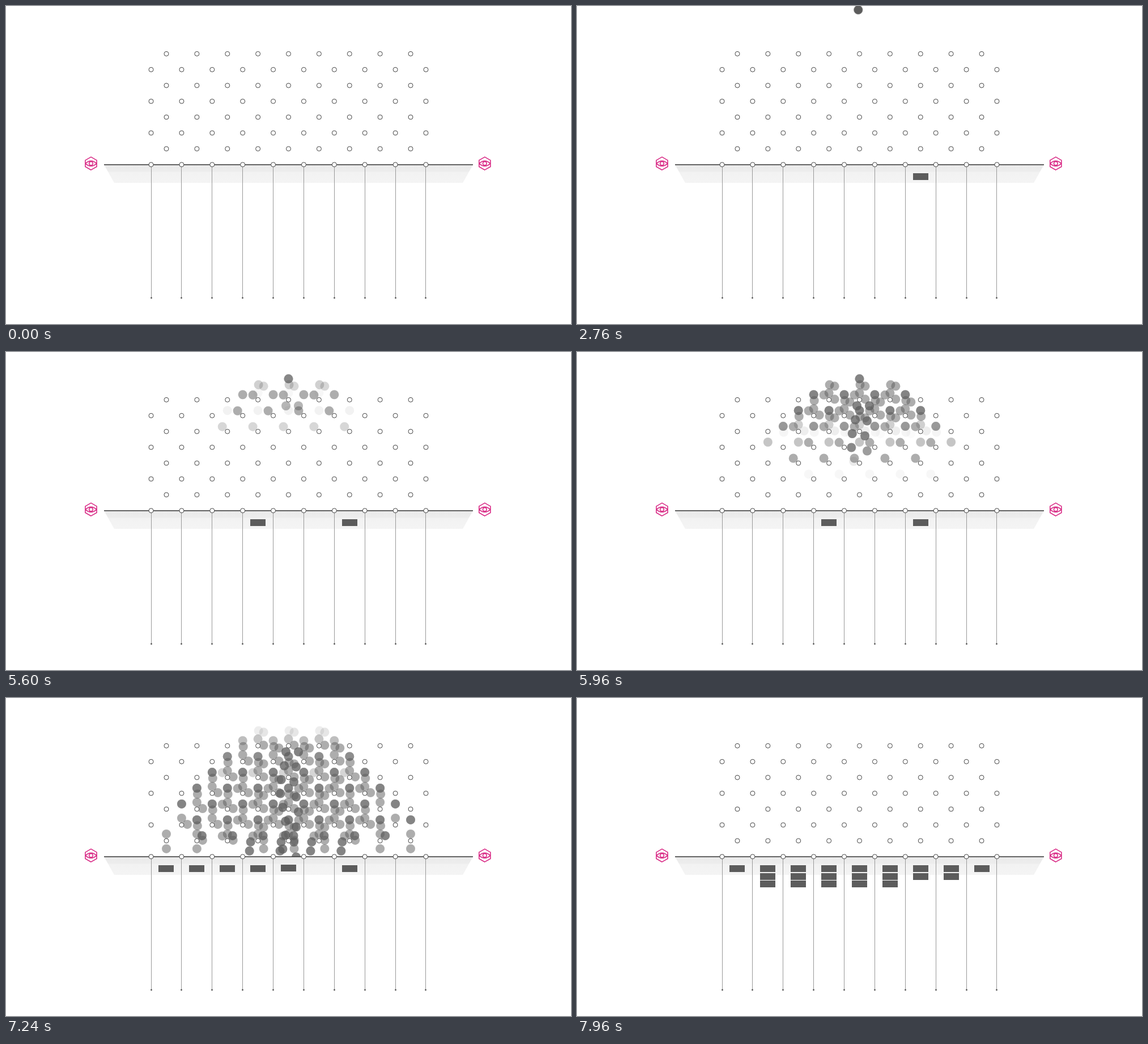
These frames come from a looping animation (997 by 561 pixels, 8000 ms). An HTML page with a canvas:

```html
<!DOCTYPE html>
<html lang="en">
<head>
<meta charset="utf-8">
<title>Peg board</title>
<style>
html, body { margin: 0; width: 100%; height: 100%; overflow: hidden; background: #fff; }
canvas { display: block; }
</style>
</head>
<body>
<canvas width="997" height="561"></canvas>
<script>
const ctx = document.querySelector('canvas').getContext('2d');
const LOOP = 8000, MID = 498.5, HALF = 26.94, TOP = 84.3, ROW = 27.93, FLOOR = 280;
const GREY = '#5c5c5c', PINK = '#d92b86';

const colX = k => MID + k * HALF;
const rowY = r => TOP + r * ROW;
const clamp = v => Math.max(0, Math.min(1, v));

function circle(x, y, r, fill, stroke, width = 1) {
  ctx.beginPath();
  ctx.arc(x, y, r, 0, Math.PI * 2);
  if (fill) { ctx.fillStyle = fill; ctx.fill(); }
  if (stroke) { ctx.strokeStyle = stroke; ctx.lineWidth = width; ctx.stroke(); }
}

function line(x1, y1, x2, y2, color, width) {
  ctx.beginPath();
  ctx.moveTo(x1, y1);
  ctx.lineTo(x2, y2);
  ctx.strokeStyle = color;
  ctx.lineWidth = width;
  ctx.stroke();
}

// Single balls: time of the first hit, time per row, left or right turn at each row
const balls = [
  { start: 20, hit: 220, step: 270, path: 'RRLRLRRR' },
  { start: 2580, hit: 2990, step: 262, path: 'LRLLLRRL' }
];

function drawBall({ start, hit, step, path }, t) {
  if (t < start) return;
  const turns = [...path].map(c => c === 'R' ? 1 : -1);
  const stage = (t - hit) / step;
  if (stage < 0) {
    const fall = (t - start) / (hit - start);
    circle(MID + turns[0] * 5 * fall, -9 + 81 * fall * fall, 7.8, GREY, '#929292', 0.8);
    return;
  }
  const row = Math.floor(stage), u = stage - row;
  if (row >= turns.length) return;
  const col = turns.slice(0, row).reduce((a, b) => a + b, 0);
  const from = colX(col) + turns[row] * 5;
  const to = colX(col + turns[row]) + (turns[row + 1] || 0) * 5;
  const y = rowY(row) - 11 + ROW * Math.sin(u * Math.PI / 2);
  circle(from + (to - from) * u, y, 7.8, GREY, '#929292', 0.8);
}

// Ghosts: each layer appears and vanishes behind a front moving down the board
const fast = { lead: 131, speed: 0.2, out: 131 };
const middle = { lead: 93, speed: 0.2, out: 95 };
const late = { lead: 60, speed: 0.195, out: 66 };
const core = { lead: 95, speed: 0.24, out: 66 };
const ghosts = [];

function addGhost(x, y, ...layers) {
  for (const layer of layers) ghosts.push({ x, y, layer });
}

// Repeats one offset at every peg that passes the test
function addAtPegs(dx, dy, test, ...layers) {
  for (let r = 0; r < 8; r++)
    for (let k = -8 + r % 2; k <= 8; k += 2)
      if (test(k, r)) addGhost(colX(k) + dx, rowY(r) + dy, ...layers);
}

const dome = (k, r) => r < 7 && Math.abs(k) <= r + 2;
const centre = (k, r) => r < 7 && Math.abs(k - 0.5) <= 2.5;
const lastPegs = (k, r) => r === 7 && Math.abs(k) <= 3;

addAtPegs(0, -37, (k, r) => dome(k, r) && k >= -7 && (r > 0 || k === 0), middle, late);
addAtPegs(1, -26.5, (k, r) => dome(k, r) && Math.abs(k) <= 6, late);
addAtPegs(0, -12, dome, late);
addAtPegs(10, -1, (k, r) => dome(k, r) && k >= -7 && k <= 5, late);
addAtPegs(10, -24, centre, late);
addAtPegs(-9, -8.5, (k, r) => dome(k, r) && Math.abs(k - 0.5) <= 4.5, fast);
addAtPegs(9, -9, (k, r) => r === 6 && Math.abs(k) <= 6, core, core);
addAtPegs(12, -10, lastPegs, core, core);
addAtPegs(14, -26, lastPegs, core, core);
addAtPegs(10, 14, (k, r) => r === 6 && centre(k, r), late);
addAtPegs(0, 14, (k, r) => r === 6 && Math.abs(k) >= 6, late);

// Two wavering streams down the middle
for (let i = 0; i < 8; i++) {
  addGhost(489 + 5 * Math.cos(i * 1.14), 95 + 24.5 * i, core, core);
  addGhost(512 + 4 * Math.cos(i * Math.PI / 2), 95 + 26.5 * i, core, core);
}

function drawGhosts(t) {
  const rush = Math.max(0, t - 7600) * 0.6;
  for (const { x, y, layer } of ghosts) {
    const shown = clamp((layer.lead + layer.speed * (t - 5600) - y) / 30 + 0.5);
    const gone = clamp((layer.out + 0.2 * (t - 7240) + rush - y) / 30 + 0.5);
    ctx.globalAlpha = 0.5 * shown * (1 - gone);
    if (ctx.globalAlpha > 0) circle(x, y, 8, GREY);
  }
  ctx.globalAlpha = 1;
}

// Blocks: two single arrivals, then sweeps from left to right up to the final heights
const heights = [1, 3, 3, 3, 3, 3, 2, 2, 1];
const blocks = [{ bin: 6, time: 2500 }, { bin: 3, time: 5060 }];
const singles = blocks.map(b => b.bin);
for (let level = 0, time = 7068; level < 3; level++)
  heights.forEach((height, bin) => {
    if (height <= level || (level === 0 && singles.includes(bin))) return;
    blocks.push({ bin, time });
    time += 44;
  });

function drawBlocks(t) {
  const counts = heights.map(() => 0);
  ctx.fillStyle = GREY;
  for (const { bin, time } of blocks) {
    if (t < time) continue;
    const rest = 1 - clamp((t - time) / 120);
    const y = 295 + 13.5 * counts[bin]++ - 3 * rest * rest;
    ctx.fillRect(Math.round(colX(bin * 2 - 8) - 13.5), Math.round(y), 27, 12);
  }
}

function drawEye(x, y) {
  ctx.beginPath();
  for (let i = 0; i < 6; i++) {
    const a = Math.PI * (i / 3 + 0.5);
    ctx.lineTo(x + 11.6 * Math.cos(a), y + 11.4 * Math.sin(a));
  }
  ctx.closePath();
  ctx.moveTo(x - 10, y);
  ctx.quadraticCurveTo(x, y - 9, x + 10, y);
  ctx.quadraticCurveTo(x, y + 9, x - 10, y);
  ctx.strokeStyle = PINK;
  ctx.lineWidth = 1.6;
  ctx.stroke();
  circle(x, y, 3.3, null, PINK, 1.6);
}

function drawShade() {
  ctx.beginPath();
  ctx.moveTo(173, FLOOR);
  ctx.lineTo(824, FLOOR);
  ctx.lineTo(806, 312);
  ctx.lineTo(191, 312);
  ctx.closePath();
  const shade = ctx.createLinearGradient(0, FLOOR, 0, 312);
  shade.addColorStop(0, '#eaeaea');
  shade.addColorStop(0.38, '#ededed');
  shade.addColorStop(0.4, '#f2f2f2');
  shade.addColorStop(1, '#f4f4f4');
  ctx.fillStyle = shade;
  ctx.fill();
}

function drawBoard() {
  line(173, FLOOR, 824, FLOOR, '#333', 1.6);
  for (let k = -9; k <= 9; k += 2) {
    const x = Math.floor(colX(k)) + 0.5;
    line(x, FLOOR, x, 515, '#999', 1);
    circle(x, 515, 1.4, '#555');
  }
  for (let r = 0; r < 8; r++) {
    const edge = r % 2 ? 9 : 8;
    for (let k = -edge; k <= edge; k += 2) circle(colX(k), rowY(r), 4, '#fff', '#444', 1);
  }
}

function draw(t) {
  ctx.fillStyle = '#fff';
  ctx.fillRect(0, 0, 997, 561);
  drawShade();
  ctx.save();
  ctx.beginPath();
  ctx.rect(0, 0, 997, FLOOR);
  ctx.clip();
  balls.forEach(ball => drawBall(ball, t));
  drawGhosts(t);
  ctx.restore();
  drawBlocks(t);
  drawBoard();
  drawEye(150, 277.8);
  drawEye(844.8, 277.8);
}

const begin = performance.now();
function tick() {
  draw((performance.now() - begin) % LOOP);
  requestAnimationFrame(tick);
}
tick();
</script>
</body>
</html>
```
